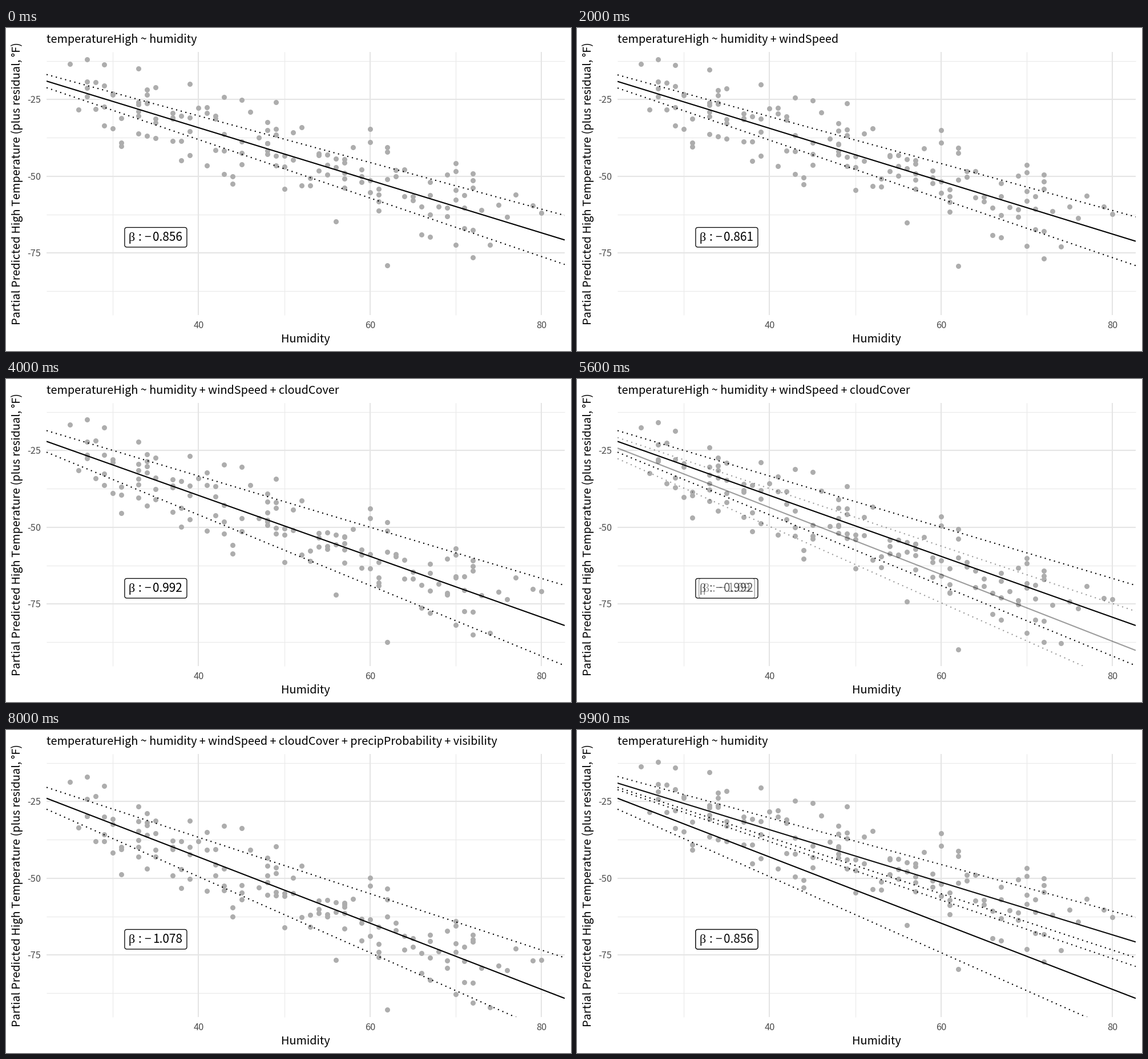
Animation, 990 px wide and 566 px high, one loop 10000 ms. Source, as a matplotlib script:

```python
import numpy as np
import matplotlib.pyplot as plt
from matplotlib.animation import FuncAnimation
from matplotlib.patches import FancyBboxPatch, Rectangle

W, H, DPI = 990, 566, 100
PX = 72 / DPI
LEFT, RIGHT, TOP, BOTTOM = 71, 979, 42, 502.5
SANS, SERIF = "Noto Sans CJK JP", "Liberation Serif"

STATES, PER_STATE, STEPS = 5, 20, 7
SLOPE = [-0.856, -0.861, -0.992, -1.09, -1.078]
MARGIN = [0.0965, 0.096, 0.158, 0.154, 0.16]
TERMS = ["humidity", "windSpeed", "cloudCover", "precipProbability", "visibility"]
TITLES = ["temperatureHigh ~ " + " + ".join(TERMS[:k + 1]) for k in range(STATES)]

# The outermost observations: humidity, temperature
OUTLIERS = [(25, -13.4), (29, -13.7), (33, -15), (39, -20), (45, -25.2),
            (49, -26), (60, -34.6), (70, -45.9), (77, -56), (79, -59.5),
            (80, -62), (76, -63.3), (72, -76.5), (62, -79), (56, -64.8),
            (44, -52.5), (38, -44.9), (31, -40.3)]


def px(humidity):
    return 337.4 + 15.02 * (humidity - 40)


def py(temperature):
    return 125 - 5.38 * (temperature + 25)


def humidity_at(x):
    return 40 + (x - 337.4) / 15.02


def observations():
    """Humidity, distance from the one-term fit, drift towards the full fit."""
    rng = np.random.default_rng(12)
    spread = np.linspace(26, 74, 131)
    h = np.clip(np.round(spread + rng.normal(0, 1, spread.size)), 26, 77)
    residual = np.clip(rng.normal(0, 6.8, h.size), -12.5, 12.5)
    out_h, out_t = np.array(OUTLIERS).T
    h = np.append(h, out_h)
    residual = np.append(residual, out_t - SLOPE[0] * out_h)
    drift = rng.normal(-0.7, 2, h.size) - 0.12 * residual
    return h, residual, drift


humidity, residual, drift = observations()
dot_x = px(humidity)
DOT_Y = [py(slope * humidity + residual + drift * min(1, 4.4 * (SLOPE[0] - slope)))
         for slope in SLOPE]

fig = plt.figure(figsize=(W / DPI, H / DPI), dpi=DPI, facecolor="white")
ax = fig.add_axes([0, 0, 1, 1])
ax.set(xlim=(0, W), ylim=(H, 0))
ax.axis("off")


def label(x, y, text, size, color="black", family=SANS, **kw):
    return ax.text(x, y, text, fontsize=size * PX, color=color,
                   family=family, va="baseline", **kw)


def draw_grid():
    major = dict(color="#e5e5e5", lw=2.1 * PX, zorder=1)
    minor = dict(color="#ebebeb", lw=1.2 * PX, zorder=0)
    for h in range(30, 81, 10):
        ax.plot([px(h)] * 2, [TOP, BOTTOM], solid_capstyle="butt",
                **(minor if h % 20 else major))
    for t in np.arange(-87.5, -12, 12.5):
        ax.plot([LEFT, RIGHT], [py(t)] * 2, solid_capstyle="butt",
                **(minor if t % 25 else major))
    for h in (40, 60, 80):
        label(px(h), 525.5, str(h), 16.4, "#4d4d4d", ha="center")
    for t in (-25, -50, -75):
        label(61, py(t) + 6, str(t), 16.4, "#4d4d4d", ha="right")
    label(525, 551, "Humidity", 19.8, ha="center")
    label(25, 272, "Partial Predicted High Temperature (plus residual, °F)",
          19.9, ha="center", rotation=90, rotation_mode="anchor")


class Model:
    """Fitted line, its band and the slope label."""

    def __init__(self, z):
        self.x = np.array([LEFT, RIGHT])
        clip = Rectangle((LEFT, TOP), RIGHT - LEFT, BOTTOM - TOP,
                         transform=ax.transData)
        self.lines = []
        for style in ("-", (0, (1, 3)), (0, (1, 3))):
            line, = ax.plot([], [], color="black", lw=2.1 * PX, ls=style,
                            solid_capstyle="butt", dash_capstyle="butt",
                            zorder=3 + z)
            line.set_clip_path(clip)
            self.lines.append(line)
        self.box = FancyBboxPatch((0, 0), 1, 1, fc="white", ec="black",
                                  boxstyle="round,pad=0,rounding_size=4",
                                  lw=1.3 * PX, zorder=6 + 2 * z)
        ax.add_patch(self.box)
        text_z = 7 + 2 * z
        self.parts = [
            (7, label(0, 373, "β", 22, family=SERIF, zorder=text_z)),
            (26, label(0, 373, ":", 20.8, ha="center", zorder=text_z)),
            (40.5, label(0, 373, "−", 20.8, ha="center", zorder=text_z)),
            (49, label(0, 373, "", 20.8, zorder=text_z))]

    def show(self, k, alpha):
        h = humidity_at(self.x)
        for line, side in zip(self.lines, (0, 1, -1)):
            line.set_data(self.x, py((SLOPE[k] + side * MARGIN[k]) * h))
            line.set_alpha(alpha)
        digits = f"{-SLOPE[k]:g}"
        width = 51.5 + 11.5 * len(digits)
        left = 262.4 - width / 2
        self.box.set_bounds(left, 349.5, width, 34.5)
        self.box.set_alpha(alpha)
        self.parts[-1][1].set_text(digits)
        for dx, part in self.parts:
            part.set_x(left + dx)
            part.set_alpha(alpha)


draw_grid()
title = label(71, 26, "", 19.8)
dots = ax.scatter(dot_x, DOT_Y[0], s=(9 * PX) ** 2, c="#adadad", lw=0, zorder=2)
current, entering = Model(0), Model(1)


def update(frame):
    k, tick = divmod(frame, PER_STATE)
    following = (k + 1) % STATES
    step = max(0, tick - (PER_STATE - STEPS))
    ease = (1 - np.cos(np.pi * step / STEPS)) / 2
    title.set_text(TITLES[following if ease > 0.5 else k])
    y = DOT_Y[k] + ease * (DOT_Y[following] - DOT_Y[k])
    dots.set_offsets(np.column_stack([dot_x, y]))
    current.show(k, 1)
    entering.show(following, ease)


anim = FuncAnimation(fig, update, frames=STATES * PER_STATE, interval=100,
                     repeat=True, repeat_delay=0, blit=False)
plt.show()
```
